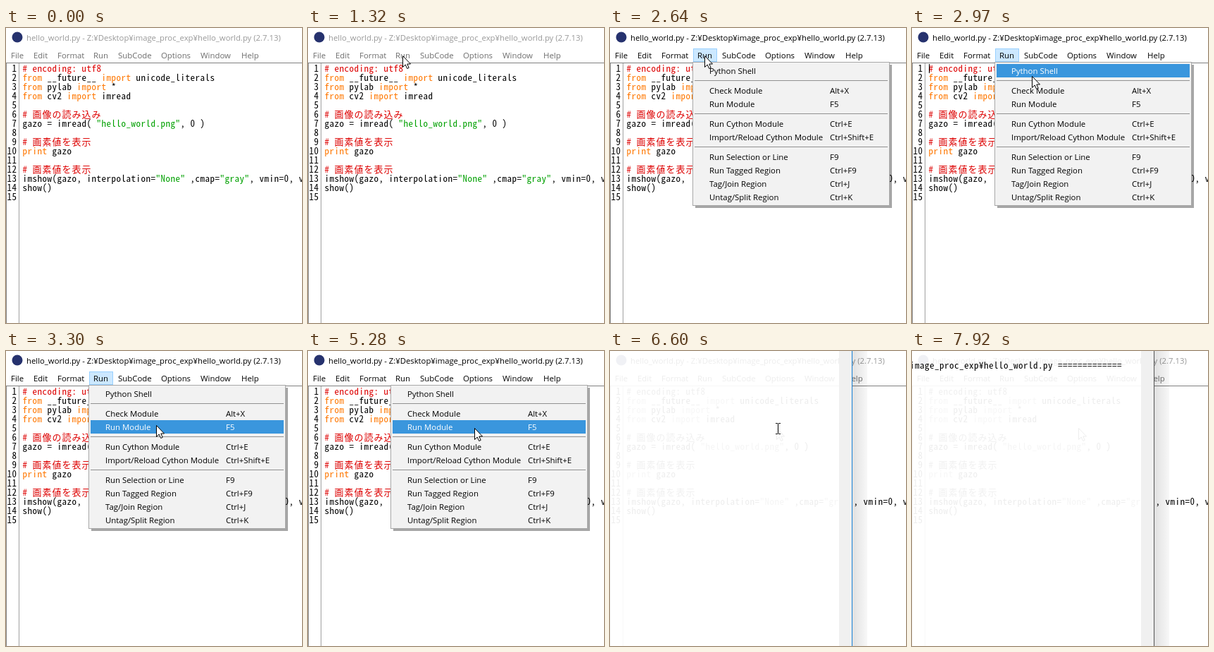
Animation, 420 px wide and 418 px high, one loop 8 s. Source, as an HTML page:

```html
<!DOCTYPE html>
<html lang="en">
<head>
<meta charset="utf-8">
<title>Run a module</title>
<style>
  html, body { margin: 0; width: 100%; height: 100%; overflow: hidden; background: #fff; }
  svg { display: block; width: 420px; height: 418px; }
  text { white-space: pre; }
  .ui { font: 11.4px "Open Sans", "Noto Sans", sans-serif; }
  .title { font-size: 11.3px; }
  .code { font-family: "Noto Sans Mono CJK JP", "Liberation Mono", monospace; font-size: 13px; }
  .wide { font: 500 13px "Noto Sans Mono CJK JP", "Noto Sans CJK JP", sans-serif; letter-spacing: 1px; }
</style>
</head>
<body>
<svg id="stage" viewBox="0 0 420 418" xmlns="http://www.w3.org/2000/svg">
  <defs>
    <linearGradient id="shade">
      <stop offset="0" stop-color="#000" stop-opacity=".12"/>
      <stop offset="1" stop-color="#000" stop-opacity=".03"/>
    </linearGradient>
  </defs>
  <rect width="420" height="418" fill="#fff"/>
  <circle cx="16" cy="13" r="7.5" fill="#26326e"/>
  <rect id="runBox" x="118.5" y="29.5" width="33" height="18" fill="#cce8ff" stroke="#99d1ff"/>
  <g id="bar"></g>
  <path d="M0 49.5H420M.5 49V418" stroke="#808080"/>
  <path d="M18.5 50V418" stroke="#a0a0a0"/>
  <g id="editor"></g>
  <rect id="caret" x="24" y="51" width="1" height="13"/>
  <g id="menu">
    <path d="M397 52h3v203H121v-3h276z" fill="#000" opacity=".35"/>
    <g id="panel">
      <rect x="117.5" y="48.5" width="279" height="203" fill="#f2f2f2" stroke="#a8a8a8"/>
      <path d="M120 74.5H394M120 121.5H394M120 168.5H394" stroke="#919191"/>
      <rect id="pick" x="120" width="274" height="19" fill="#3a96dd"/>
    </g>
  </g>
  <path id="arrow" d="M.5 .5V16.5L4.2 13L6.7 18.5L9.2 17.4L6.8 12H11.5Z" fill="#fff" stroke="#000"/>
  <g id="shell">
    <!-- dims the caption and menu bar left uncovered -->
    <rect x="344" width="76" height="29" fill="#fff" opacity=".6"/>
    <rect x="344" y="29" width="76" height="20" fill="#fff" opacity=".43"/>
    <rect x="344" width="21" height="418" fill="url(#shade)"/>
    <rect width="343" height="418" fill="#fff" opacity=".93"/>
    <rect x="325" width="18" height="418" fill="#f0f0f0"/>
    <rect id="edge" x="343" width="1" height="418"/>
  </g>
  <path id="beam" d="M0 .5H3M4 .5H7M3.5 1V15M0 15.5H3M4 15.5H7" fill="none" stroke="#000"/>
</svg>
<script>
const LOOP = 8000, CELL = 7, LINE = 13, LEFT = 23.5, GUTTER = 15.5, BASE = 62;
const $ = id => document.getElementById(id);
const show = (id, on) => $(id).setAttribute('visibility', on ? 'visible' : 'hidden');

function label(parent, x, y, str, cls, fill = '#000') {
  const node = document.createElementNS('http://www.w3.org/2000/svg', 'text');
  node.setAttribute('x', x);
  node.setAttribute('y', y);
  node.setAttribute('class', cls);
  node.setAttribute('fill', fill);
  node.textContent = str;
  $(parent).appendChild(node);
  return node;
}

// Fixed-pitch text on a 7px grid
const pen = document.createElement('canvas').getContext('2d');
pen.font = '13px "Noto Sans Mono CJK JP", "Liberation Mono", monospace';
const spacing = CELL - pen.measureText('0').width;
function mono(parent, x, y, str, fill) {
  const node = label(parent, x, y, str, 'code', fill);
  node.style.letterSpacing = spacing + 'px';
  return node;
}

// Window caption and menu bar
const title = label('bar', 29, 18,
  'hello_world.py - Z:¥Desktop¥image_proc_exp¥hello_world.py (2.7.13)', 'ui title');
const tabs = [['File', 7], ['Edit', 39], ['Format', 73], ['Run', 124], ['SubCode', 159],
  ['Options', 220], ['Window', 276], ['Help', 334]].map(([s, x]) => label('bar', x, 43, s, 'ui'));

// Source text: k keyword, s string, c comment, w wide comment, n plain
const COLORS = { k: '#ff7700', s: '#00a000', c: '#dd0000', w: '#dd0000', n: '#000' };
const SOURCE = [
  [['c', '# encoding: utf8']],
  [['k', 'from'], ['n', ' __future__ '], ['k', 'import'], ['n', ' unicode_literals']],
  [['k', 'from'], ['n', ' pylab '], ['k', 'import'], ['n', ' *']],
  [['k', 'from'], ['n', ' cv2 '], ['k', 'import'], ['n', ' imread']],
  [],
  [['c', '# '], ['w', '画像の読み込み']],
  [['n', 'gazo = imread( '], ['s', '"hello_world.png"'], ['n', ', 0 )']],
  [],
  [['c', '# '], ['w', '画素値を表示']],
  [['k', 'print'], ['n', ' gazo']],
  [],
  [['c', '# '], ['w', '画素値を表示']],
  [['n', 'imshow(gazo, interpolation='], ['s', '"None"'], ['n', ' ,cmap='], ['s', '"gray"'],
    ['n', ', vmin=0, v']],
  [['n', 'show()']],
  []
];
SOURCE.forEach((tokens, i) => {
  const y = BASE + LINE * i, num = String(i + 1);
  mono('editor', GUTTER - CELL * num.length, y, num);
  let x = LEFT;
  for (const [kind, str] of tokens) {
    if (kind === 'w') label('editor', x, y, str, 'wide', COLORS.w);
    else mono('editor', x, y, str, COLORS[kind]);
    x += CELL * str.length;
  }
});

// Drop-down menu: row centre, name, shortcut
const rows = [
  [61, 'Python Shell', ''], [89, 'Check Module', 'Alt+X'], [108, 'Run Module', 'F5'],
  [136, 'Run Cython Module', 'Ctrl+E'], [155, 'Import/Reload Cython Module', 'Ctrl+Shift+E'],
  [183, 'Run Selection or Line', 'F9'], [202, 'Run Tagged Region', 'Ctrl+F9'],
  [221, 'Tag/Join Region', 'Ctrl+J'], [240, 'Untag/Split Region', 'Ctrl+K']
].map(([y, name, key]) => ({
  y, parts: [label('panel', 141, y + 4, name, 'ui'), label('panel', 312, y + 4, key, 'ui')]
}));

const output = mono('shell', -3, 25, 'image_proc_exp¥hello_world.py =============');

// Stepped tracks: [start time, value...]
const POINTER = [
  [0, ''], [330, 'beam', 253, 81], [660, 'beam', 157, 60], [990, 'arrow', 136, 44],
  [1320, 'arrow', 134, 39], [2970, 'arrow', 170, 68], [3300, 'arrow', 213, 105],
  [3630, 'arrow', 236, 109], [6600, 'beam', 235, 102], [7260, '']
];
const CARET = [[0, 0], [1980, 1], [2640, 0], [2970, 1], [3300, 0], [3630, 1], [4290, 0],
  [4620, 1], [5280, 0]];
const PICK = [[0, -1], [2970, 0], [3300, 2]];
const step = (track, t) => track.filter(k => k[0] <= t).pop();

function render(t) {
  const within = (a, b) => t >= a && t < b;
  const active = t >= 1980, shell = t >= 6600;

  title.setAttribute('fill', active ? '#000' : '#999');
  tabs.forEach(tab => tab.setAttribute('fill', active ? '#000' : '#6d6d6d'));
  show('runBox', within(1980, 5280));
  show('caret', step(CARET, t)[1]);

  $('menu').style.display = within(1980, 5610) ? '' : 'none';
  $('panel').setAttribute('opacity', t < 2310 ? 0.9 : 1);
  const pick = step(PICK, t)[1];
  show('pick', pick >= 0);
  if (pick >= 0) $('pick').setAttribute('y', rows[pick].y - 10);
  rows.forEach((row, i) => row.parts.forEach(p => p.setAttribute('fill', i === pick ? '#fff' : '#000')));

  $('shell').style.display = shell ? '' : 'none';
  $('editor').style.filter = shell ? 'grayscale(1)' : '';
  $('edge').setAttribute('fill', t < 6930 ? '#1883d7' : '#555');
  output.style.display = t >= 7920 ? '' : 'none';

  const [, kind, x, y] = step(POINTER, t);
  show('beam', kind === 'beam');
  show('arrow', kind === 'arrow' || shell);
  if (kind) $(kind).setAttribute('transform', `translate(${x} ${y})`);
  if (shell) $('arrow').setAttribute('transform', 'translate(236 109)');
}

const start = performance.now();
function tick() {
  render((performance.now() - start) % LOOP);
  requestAnimationFrame(tick);
}
tick();
</script>
</body>
</html>
```
